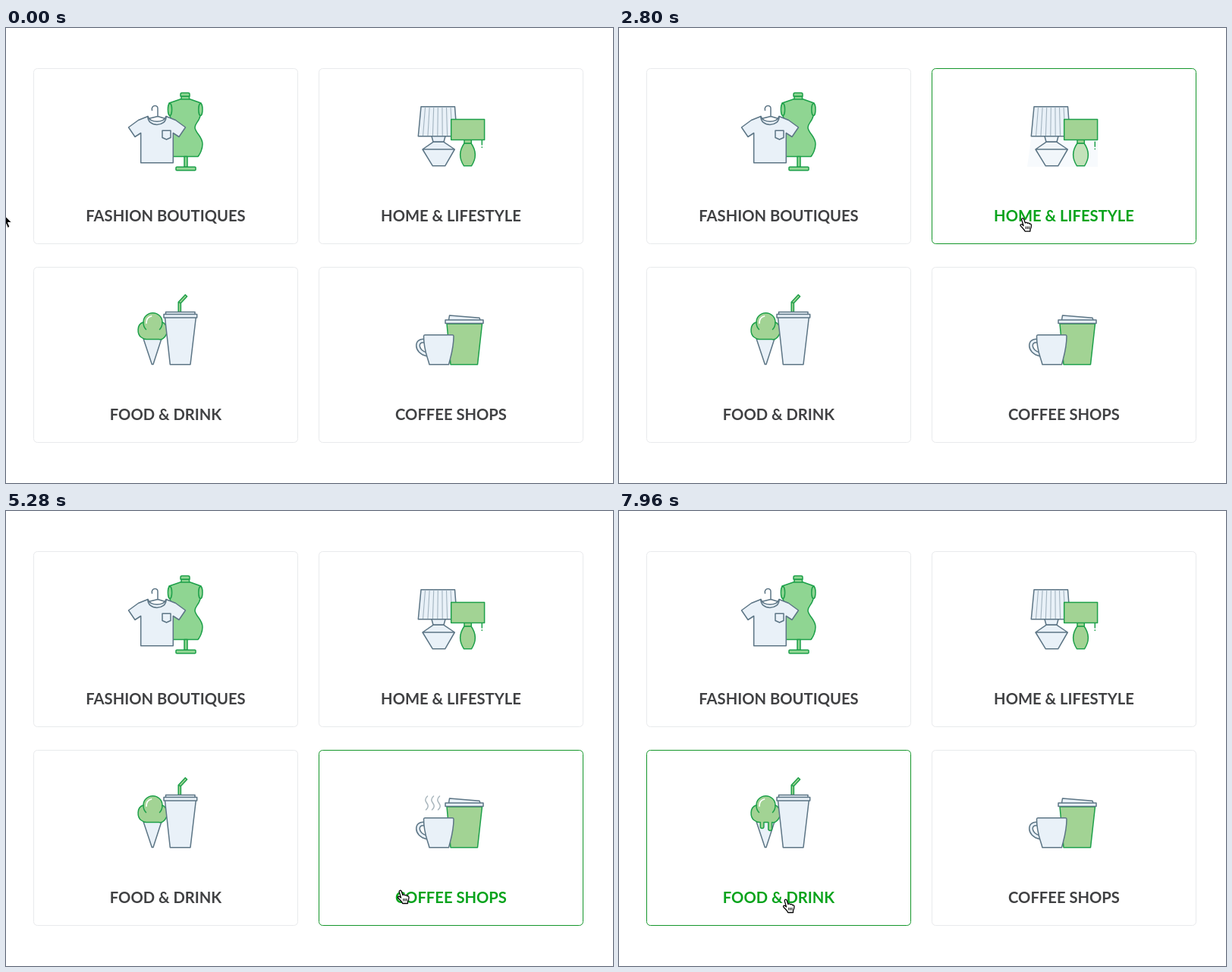
Recreate the animation shown at these times as an HTML page. Size 800x600 px, loop 8000 ms.

```html
<!DOCTYPE html>
<html lang="en">
<head>
<meta charset="utf-8">
<title>Shop categories</title>
<style>
  html, body { margin: 0; width: 100%; height: 100%; overflow: hidden; background: #fff; }
  svg { display: block; width: 800px; height: 600px; }
  .card rect { fill: #fff; }
  .card text { font: 700 20.2px Lato, "Open Sans", sans-serif; text-anchor: middle; }
  .icon { stroke-width: 1.5; stroke-linejoin: round; stroke-linecap: round; }
  .blue { fill: #e9f1f8; stroke: #5c7585; }
  .green { fill: #a2d394; stroke: #1da04a; }
  .mint { fill: #8fd592; stroke: #1da04a; }
  .line { fill: none; }
  .pleats { fill: none; stroke: #a3b4c0; stroke-width: 1.1; }
</style>
</head>
<body>
<svg viewBox="0 0 800 600">
  <g id="cards"></g>

  <g class="icon">
    <g class="mint">
      <path d="M231 93.5L215 99C213.5 105 214 111 216 116C218 124 223 126 223 131C223 138 213 143 213 153C213 159 216 166 219 169.5H253C256 166 259 159 259 153C259 143 249 138 249 131C249 126 254 124 256 116C258 111 258.5 105 257 99L241.5 93.5V90H231Z"/>
      <path d="M230 90V87.5Q230 85.5 232 85.5H240Q242 85.5 242 87.5V90ZM231 94H241.5"/>
      <ellipse cx="216" cy="107.5" rx="2.6" ry="8"/>
      <ellipse cx="256.4" cy="107.5" rx="2.6" ry="8"/>
      <rect x="235" y="169.5" width="4" height="14"/>
      <rect x="224" y="183.3" width="26" height="4.4" rx="1"/>
    </g>
    <path class="blue line" d="M192.500 108.5C191.5 104.5 194 102.5 196.5 102.5C199 102.5 200.3 104.5 200 107V117M188 119.5L200 116.5L210 119.5"/>
    <g id="shirt" class="blue">
      <path d="M187 116.5L174.5 121.5L161.5 131L170 143.5L177.7 138.5V177.7H220.3V138.5L228 143.5L236.5 131L223.5 121.5L211 116.5C209 125.5 189 125.5 187 116.5Z"/>
      <path class="line" d="M187 116.5C186 131 212 131 211 116.5M206 135.3H217V144.5L211.5 147L206 144.5Z"/>
    </g>
  </g>

  <g class="icon">
    <path id="light" fill="#e9f1f8" d="M543.5 143L538 183H631V147Z"/>
    <path class="blue" d="M547 103.7H591.5L594.5 142.7H543.3Z"/>
    <path class="pleats" id="pleats"/>
    <path class="blue bulb" d="M561 142.7H579L577 150.3H563Z"/>
    <path class="blue bulb" d="M563 150.3L549 160L562.3 181.8H578.7L591.3 160L577 150.3ZM549 160H591.3"/>
    <path class="green bulb" d="M604 152C597 162 597 172 603.5 181.8H613.5C620 172 620 162 613 152Z"/>
    <path class="green" d="M586.7 120.5H630.6V147.5H586.7ZM604 147.5H613.3V152H604Z"/>
    <path id="cord" class="green line" d="M627.3 148V154M627.3 157V157.6"/>
  </g>

  <g class="icon">
    <path class="blue" d="M180.5 408H205.5L194 443.5H192.3Z"/>
    <path class="green" id="scoop"/>
    <path class="green line" d="M181 388C181 392 182 395 184.5 397.5M206 388C206 392 205 395 202.5 397.5"/>
    <path fill="none" stroke="#fff" stroke-width="1.8" d="M185 389C185 384 187.5 381 191.5 380"/>
    <path class="green" d="M227.2 374.5V361.6L236.3 351.7L238.6 354L230.4 362.8V374.5ZM227.2 361.6L230.4 362.8"/>
    <path class="blue" d="M209.5 382H250.3L243 443.7H216.3ZM210.5 374.6H249V377.5H210.5ZM208 377.5H251.7V382H208Z"/>
  </g>

  <g class="icon">
    <path class="green" d="M581 390H627.5L621.5 443.7H586Z"/>
    <path class="blue" d="M584.5 379L624 382.3L625 385H583.5ZM579 385H629V389.6H579Z"/>
    <g fill="none">
      <path id="handle" stroke="#5c7585" stroke-width="6"/>
      <path id="handleFill" stroke="#e9f1f8" stroke-width="3"/>
    </g>
    <path class="blue" d="M552 404.7H588.5Q590 404.7 590 406.5C590 422 587 430 583.5 443.7H558C554.5 431 550.5 424 550.5 406.5Q550.5 404.7 552 404.7Z"/>
    <path id="steam" fill="none" stroke="#a9b6bd"/>
  </g>

  <g id="arrow">
    <path d="M0 0V16L3.7 12.6L6.3 18.5L9 17.3L6.5 11.6H11.5Z" fill="#000" stroke="#fff"/>
  </g>
  <g id="hand" stroke="#000" stroke-width="1.3" stroke-linejoin="round">
    <path fill="#fff" d="M-1.8 1.6C-2 -.6 .6 -.9 1.3 1.2L2.9 6C4 4.9 5.5 5.2 5.9 6.4C7 5.5 8.4 6 8.7 7.3C9.9 6.8 11 7.6 11 9C11 12 10.3 13 9.5 14.7V17H2.7C1.7 14.4 -.6 12.6 -3 10C-4.2 8.4 -2.5 7.1 -1 8.2L.6 9.6Z"/>
    <path fill="none" stroke-width="1" d="M3.8 10.5V14M5.9 10.5V14M8 10.5V14"/>
  </g>
</svg>
<script>
const LOOP = 8000, STEP = 40, FADE = 200;
const $ = id => document.getElementById(id);
const clamp = v => Math.min(1, Math.max(0, v));
const smooth = v => (v = clamp(v)) * v * (3 - 2 * v);
const mix = (a, b, k) => a + (b - a) * k;
const mixColor = (a, b, k) => `rgb(${a.map((v, i) => Math.round(mix(v, b[i], k)))})`;

const cards = [
  { label: 'FASHION BOUTIQUES', x: 36.5, y: 53.5, enter: 1060, leave: 2500 },
  { label: 'HOME & LIFESTYLE', x: 412.5, y: 53.5, enter: 2540, leave: 4800 },
  { label: 'FOOD & DRINK', x: 36.5, y: 315.5, enter: 6535, leave: 9000 },
  { label: 'COFFEE SHOPS', x: 412.5, y: 315.5, enter: 4850, leave: 6500 }
];
const [fashion, home, food, coffee] = cards;

// Pointer stops: time, x, y
const route = [
  [0, -4, 245], [840, 6, 249], [1060, 38, 253], [1160, 138, 255], [1450, 184, 253],
  [2300, 186, 253], [2640, 520, 250], [3000, 548, 252.5], [4750, 548, 252.5],
  [5150, 520, 500.5], [6300, 520, 500.5], [6480, 430, 507], [6560, 294, 508.5],
  [6850, 220, 512.5], [LOOP, 220, 512.5]
];

function make(name, attrs, parent) {
  const el = document.createElementNS('http://www.w3.org/2000/svg', name);
  for (const key in attrs) el.setAttribute(key, attrs[key]);
  return parent.appendChild(el);
}

for (const card of cards) {
  const g = make('g', { class: 'card' }, $('cards'));
  card.box = make('rect', { x: card.x, y: card.y, width: 348, height: 231, rx: 5 }, g);
  card.text = make('text', { x: card.x + 174, y: card.y + 201.5 }, g);
  card.text.textContent = card.label;
}

$('pleats').setAttribute('d', Array.from({ length: 7 }, (_, i) =>
  `M${552.5 + i * 5.6} 105L${549.6 + i * 6.4} 141.5`).join(''));

for (const id of ['handle', 'handleFill']) {
  $(id).setAttribute('d', 'M552 412.800C540 410 539 427 555 430.500');
}

// CSS "ease" timing: cubic-bezier(.25, .1, .25, 1)
function ease(x) {
  const bezier = (s, a, b) => 3 * s * (1 - s) ** 2 * a + 3 * s * s * (1 - s) * b + s ** 3;
  let low = 0, high = 1;
  for (let i = 0; i < 20; i++) {
    const mid = (low + high) / 2;
    if (bezier(mid, .25, .25) < x) low = mid; else high = mid;
  }
  return bezier(low, .1, 1);
}

const isOver = (card, t) => t >= card.enter && t < card.leave;
const age = (card, t) => isOver(card, t) ? t - card.enter : 0;

function drawCards(t) {
  for (const { box, text, enter, leave } of cards) {
    const k = clamp((t - enter) / FADE) - clamp((t - leave) / FADE);
    box.setAttribute('stroke', mixColor([232, 234, 236], [20, 150, 42], k));
    text.setAttribute('fill', mixColor([64, 65, 67], [8, 163, 28], k));
  }
}

function drawShirt(t) {
  const turn = Math.cos(ease(clamp(age(fashion, t) / 1000)) * 2 * Math.PI);
  $('shirt').setAttribute('transform', `translate(199 0) scale(${turn} 1) translate(-199 0)`);
}

function drawLamps(t) {
  const a = age(home, t), on = smooth((a - 200) / 150);
  $('light').setAttribute('opacity', on);
  $('cord').setAttribute('transform', `translate(0 ${3 * Math.sin(Math.PI * clamp(a / 350))})`);
  document.querySelectorAll('.bulb').forEach(el => {
    const off = el.classList.contains('blue') ? [233, 241, 248] : [162, 211, 148];
    el.style.fill = mixColor(off, [255, 255, 255], on);
  });
}

function drawIceCream(t) {
  const k = smooth((age(food, t) - 150) / 800);
  const drip = (x, width, length) => {
    const r = width / 2, y = 410.5 + Math.max(0, length * k - r);
    return `H${x}V${y}a${r} ${r * k} 0 0 0 ${width} 0V410.5`;
  };
  $('scoop').setAttribute('d',
    'M181 388C172 390.5 172.5 404 178.5 408C181 410 183.5 410.7 186 410.5' +
    drip(186.3, 4.6, 8) + drip(196.8, 4.8, 11) +
    'C204 411.5 207 410 209.5 407C214.5 401 212 390 206 388A12.5 12.3 0 0 0 181 388Z');
}

function drawSteam(t) {
  const a = age(coffee, t);
  const shown = smooth(a / 350) * (1 - smooth((a - 1150) / 350));
  const rise = 2 - 4 * clamp(a / 860);
  $('steam').setAttribute('opacity', shown);
  $('steam').setAttribute('transform', `translate(0 ${rise})`);
  $('steam').setAttribute('d', [555.5, 563.5, 571.5].map(x =>
    `M${x} 376c-4 4 -3 6 -1 9s3 5 -1 9`).join(''));
}

function drawPointer(t) {
  const i = Math.max(1, route.findIndex(stop => stop[0] > t));
  const [t0, x0, y0] = route[i - 1], [t1, x1, y1] = route[i];
  const k = (t - t0) / (t1 - t0);
  const over = cards.some(card => isOver(card, t));
  for (const [id, shown] of [['arrow', !over], ['hand', over]]) {
    $(id).setAttribute('transform', `translate(${mix(x0, x1, k)} ${mix(y0, y1, k)})`);
    $(id).setAttribute('visibility', shown ? 'visible' : 'hidden');
  }
}

function frame() {
  const t = Math.floor(performance.now() % LOOP / STEP) * STEP;
  for (const draw of [drawCards, drawShirt, drawLamps, drawIceCream, drawSteam, drawPointer]) draw(t);
  requestAnimationFrame(frame);
}
frame();
</script>
</body>
</html>
```
